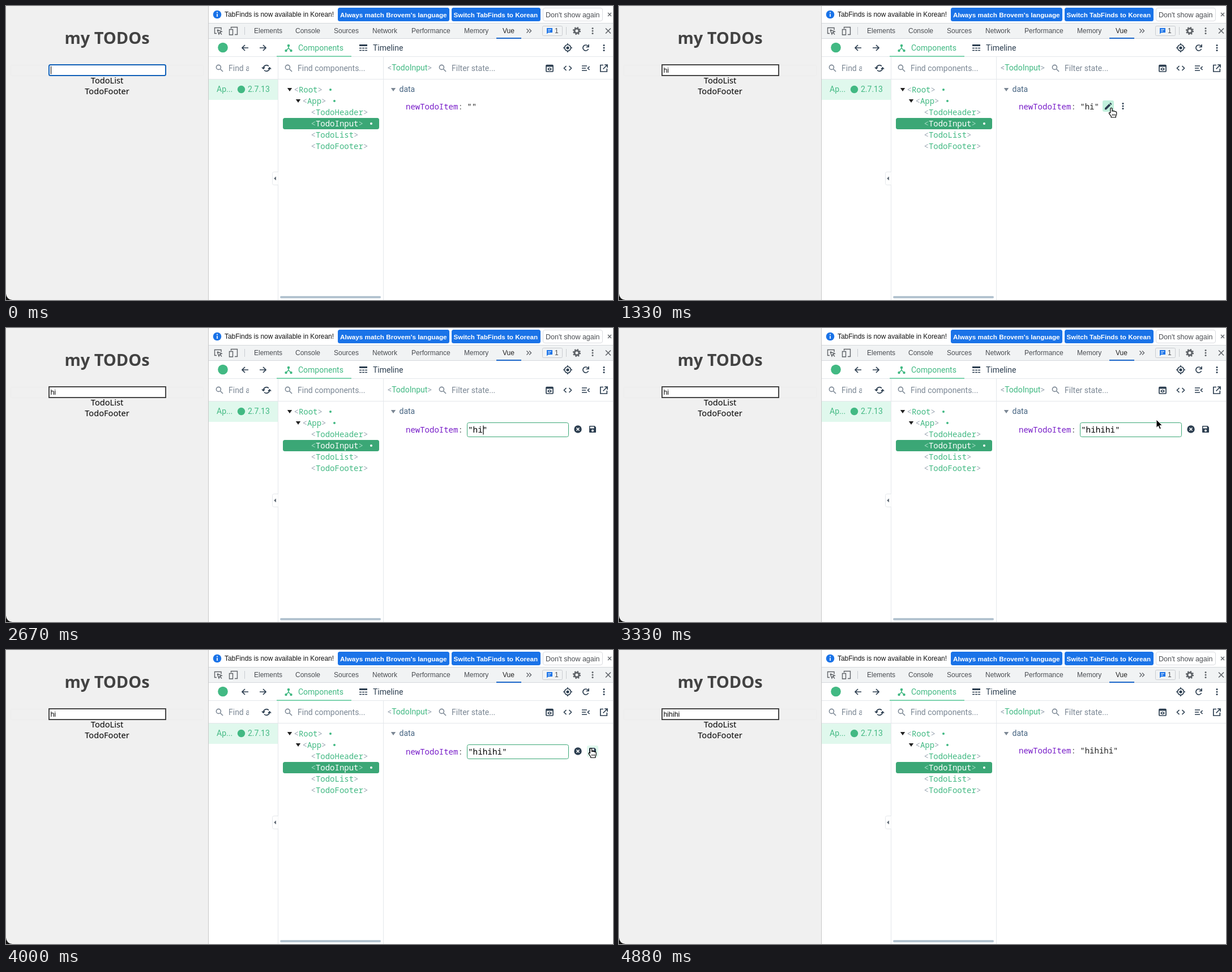
Animation of 1072x520 px, one loop 5.43 s. Source, as an HTML page:

```html
<!DOCTYPE html>
<html lang="en">
<head>
<meta charset="utf-8">
<title>Todo input inspector</title>
<style>
html, body { margin: 0; width: 100%; height: 100%; overflow: hidden; background: #fff; }
svg { display: block; }
text { white-space: pre; }
.ui { font: 12px "Liberation Sans", Arial, sans-serif; fill: #4a4d52; }
.bold { font: bold 11.7px "Liberation Sans", Arial, sans-serif; fill: #fff; }
.app { font: 14px Roboto, sans-serif; fill: #2c3e50; }
.mono { font: 14px "Noto Sans Mono", monospace; fill: #222; }
.page { font: 14.6px "Noto Sans", sans-serif; fill: #000; text-anchor: middle; }
.app.hint { fill: #7b8794; }
.app.green, .mono.green { fill: #42b983; }
.dim { fill: #9aa5b1; }
.line { fill: none; stroke: #e4e7eb; }
.icon { fill: none; stroke: #2c3e50; stroke-width: 1.7; }
.grey { fill: none; stroke: #5f6368; stroke-width: 1.4; }
.dark { fill: #2c3e50; }
</style>
</head>
<body>
<svg width="1072" height="520" viewBox="0 0 1072 520">
  <defs>
    <g id="search" fill="none" stroke="#7b8794" stroke-width="1.6"><circle cx="-1.6" cy="-1.6" r="4"/><path d="M1.5 1.5 6 6"/></g>
    <g id="dots"><circle cy="-4.5" r="1.5"/><circle r="1.5"/><circle cy="4.5" r="1.5"/></g>
    <path id="down" d="M-4.2-3h8.4L0 3z"/>
    <path id="arrow" d="M0 0v14.5l3.4-3.2 2.4 5.6 2.5-1.1-2.4-5.4h4.7z" fill="#000" stroke="#fff"/>
    <path id="beam" d="M-3.5-7.5Q0-7.5 0-5V5Q0 7.5-3.5 7.5M3.5-7.5Q0-7.5 0-5M0 5Q0 7.5 3.5 7.5M-2 2.5h4" fill="none" stroke="#222" stroke-width="1.2"/>
    <g id="hand"><path d="M-1.6 9V1.3Q0-.8 1.6 1.3V6q1.5-1.2 2.7.3 1.5-1 2.5.6 2.2-.5 2.4 1.6v3.3q-.2 1.8-1.4 3V17H-.3v-1.8l-3.6-5q-.6-2 1-1.7z" fill="#fff" stroke="#000" stroke-width="1.2"/><path d="M1.8 11v3M4.2 11v3M6.6 11v3" stroke="#000"/></g>
    <clipPath id="findClip"><rect x="390" y="98" width="39" height="24"/></clipPath>
  </defs>

  <!-- page -->
  <rect width="357" height="520" fill="#f0f0f0"/>
  <path d="M0 509v11h11Q1 519 0 509z" fill="#111"/>
  <path d="M357.5 0v520" stroke="#c8c8c8"/>
  <text class="page" x="178.5" y="67" style="font-size:28.9px;font-weight:bold;fill:#424242">my TODOs</text>
  <rect class="line" x="8.5" y="104.5" width="340" height="19" rx="2" style="stroke:#ececec"/>
  <rect id="field" x="76" y="104" width="206" height="19" fill="#fff"/>
  <text id="typed" class="ui" x="78.5" y="118" style="fill:#000;font-size:12.3px"></text>
  <path id="fieldCaret" d="M0 106.5v14" stroke="#000"/>
  <text class="page" x="178.5" y="137">TodoList</text>
  <text class="page" x="178.5" y="156">TodoFooter</text>

  <!-- notice bar -->
  <circle cx="373" cy="15" r="7.3" fill="#1a73e8"/>
  <path d="M373 10.5v2M373 14v5" stroke="#fff" stroke-width="1.7"/>
  <text class="ui" x="386" y="19" style="fill:#111;font-size:11.9px">TabFinds is now available in Korean!</text>
  <rect x="586" y="3" width="197" height="24" rx="3.5" fill="#1a73e8"/>
  <text class="bold" x="590" y="19.5">Always match Brovem's language</text>
  <rect x="787" y="3" width="157" height="24" rx="3.5" fill="#1a73e8"/>
  <text class="bold" x="790.5" y="19.5" style="font-size:11.6px">Switch TabFinds to Korean</text>
  <rect x="948.5" y="3.5" width="105" height="23" rx="3.5" fill="#fff" stroke="#dadce0"/>
  <text class="ui" x="953" y="19.5" style="font-size:12.5px">Don't show again</text>
  <path class="grey" d="M1063 12l6 6m0-6-6 6"/>

  <!-- tool tabs -->
  <rect x="358" y="30" width="714" height="28" fill="#f1f3f4"/>
  <path class="line" d="M358 30.5h714M358 57.5h714" style="stroke:#d5d8dc"/>
  <g id="tabs"></g>
  <rect x="866" y="56" width="44" height="2" fill="#1b66c9"/>
  <path class="grey" d="M372 48.5h-3.5v-10h11.5v4M373 42l8 3.2-3.3 1.3 3.3 4M373 42l3 8 1.7-3.5M397.5 40v-2.5h11v13h-4.5M394.5 41.5h6v9.500h-6zM919.5 40.5l3.5 3.5-3.5 3.5M924 40.5l3.5 3.5-3.5 3.5"/>
  <path class="line" d="M421.5 37v14M989.5 37v14" style="stroke:#c9ccd0"/>
  <rect class="line" x="947.5" y="35.5" width="35" height="17" rx="2" style="stroke:#c9ccd0"/>
  <path d="M955 39h10v8h-7.5l-2.5 2.5z" fill="#1a73e8"/>
  <path d="M957 41.7h6M957 44.3h4" stroke="#fff"/>
  <text class="ui" x="969" y="48">1</text>
  <circle class="grey" cx="1008" cy="44" r="4" style="stroke-width:3"/>
  <circle class="grey" cx="1008" cy="44" r="6" style="stroke-width:2.2;stroke-dasharray:2.3 2.41"/>
  <use href="#dots" x="1036" y="44" fill="#5f6368"/>
  <path class="grey" d="M1059 39.5l9 9m0-9-9 9" style="stroke-width:1.6"/>

  <!-- inspector header -->
  <circle cx="383" cy="73.5" r="8.8" fill="#42b983"/>
  <path class="icon" d="M428 74h-11m5-5-5 5 5 5M448 74h11m-5-5 5 5-5 5"/>
  <path class="line" d="M358 89.5h714M358 129.5h714M480.5 90v430M666.5 90v430"/>
  <rect x="478" y="88" width="132" height="2" fill="#7dd3ae"/>
  <g fill="#42b983"><circle cx="499" cy="70" r="2.3"/><circle cx="494.5" cy="79" r="2.2"/><circle cx="503.5" cy="79" r="2.2"/></g>
  <path d="M499 70v4.5l-4.5 4.5M499 74.5l4.5 4.5" fill="none" stroke="#42b983" stroke-width="1.6"/>
  <text class="app green" x="516" y="79">Components</text>
  <path class="icon" d="M624 69.5h14" style="stroke-width:3"/>
  <path class="icon" d="M624 74.5h14M624 78.5h14" style="stroke-dasharray:4 1"/>
  <text class="app" x="648" y="79">Timeline</text>
  <circle class="icon" cx="992" cy="74" r="5.5"/><circle class="dark" cx="992" cy="74" r="2.6"/>
  <path class="icon" d="M992 66v3M992 79v3M984 74h3M997 74h3M1028.5 76a5 5 0 1 1-1-5.5l1.5 1.5M1029 68v4.5h-4.5"/>
  <use href="#dots" class="dark" x="1056" y="74"/>

  <!-- filters -->
  <use href="#search" x="377" y="110"/><use href="#search" x="499" y="110"/><use href="#search" x="771" y="110"/>
  <text class="app hint" x="393" y="115" clip-path="url(#findClip)">Find apps...</text>
  <path class="icon" d="M454.5 110a5.5 5.5 0 0 1 9.5-3.5M465.5 110a5.5 5.5 0 0 1-9.5 3.5M452 108.5l2.5 2.5 2.5-2.5M463 111.5l2.5-2.5 2.5 2.5"/>
  <text class="app hint" x="515" y="115">Find components...</text>
  <text class="app green" x="674" y="114"><tspan class="dim">&lt;</tspan>TodoInput<tspan class="dim">&gt;</tspan></text>
  <text class="app hint" x="787" y="115">Filter state...</text>
  <rect class="icon" x="954" y="104.5" width="12" height="11.5" rx="1"/>
  <path class="dark" d="M954 104h12v3.5h-12zM956 111.5q4-5 8 0-4 5-8 0z"/>
  <circle cx="960" cy="111.5" r="1.2" fill="#fff"/>
  <path class="icon" d="M989.5 106l-4 4 4 4M994.5 106l4 4-4 4M1017 106h9M1017 110h7M1017 114h9M1030.5 107l-3 3 3 3M1055 104.5h-5.2v11.5h11.5v-5.2M1057 104h5v5M1061.5 104.5l-7 7"/>

  <!-- app list -->
  <rect x="358" y="130" width="122" height="36" fill="#e0f8ed"/>
  <text class="app green" x="372" y="152">Ap...</text>
  <circle cx="415.5" cy="147.5" r="6.7" fill="#42b983"/>
  <text class="app green" x="427" y="152">2.7.13</text>
  <path d="M480.5 293.5h-7q-3 0-3 3v17q0 3 3 3h7" fill="#fff" stroke="#e4e7eb"/>
  <path d="M477 301.5v7l-4-3.5z" fill="#66707a"/>
  <rect x="484" y="513" width="178" height="4" rx="2" fill="#b3c3d0"/>

  <!-- component tree -->
  <rect x="489" y="198" width="170" height="20" rx="3.5" fill="#3ba776"/>
  <use href="#down" x="501" y="148" fill="#222"/><use href="#down" x="516" y="168" fill="#222"/>
  <g id="tree"></g>
  <g fill="#42b983"><circle cx="573" cy="148" r="2"/><circle cx="580" cy="168" r="2"/><circle cx="645" cy="208" r="2" fill="#fff"/></g>

  <!-- state -->
  <use href="#down" x="684" y="148" fill="#7b8794"/>
  <text class="app" x="694.5" y="152" style="fill:#476582">data</text>
  <text id="key" class="mono" x="706" y="183"><tspan fill="#771cc8">newTodoItem</tspan><tspan fill="#555">:</tspan></text>
  <text id="value" class="mono" x="814.3" y="183"></text>
  <g id="tools">
    <rect x="854" y="167" width="20" height="20" rx="3" fill="#c2f0dc"/>
    <path class="dark" d="M858 180.5l7.5-7.5 2.7 2.7-7.5 7.5H858zM866.3 172.2l1.5-1.5 2.7 2.7-1.5 1.5z"/>
    <use href="#dots" class="dark" x="890" y="177"/>
  </g>
  <g id="editor">
    <rect x="814.5" y="167.5" width="179" height="25" rx="3" fill="#fff" stroke="#3ba776"/>
    <text id="draft" class="mono" x="816" y="185" style="font-size:14.3px;fill:#000"></text>
    <path id="caret" d="M0 172.5v16" stroke="#000" stroke-width="1.2"/>
    <circle class="dark" cx="1010" cy="179" r="6.7"/>
    <path d="M1007.5 176.5l5 5m0-5-5 5" stroke="#fff" stroke-width="1.6"/>
    <rect id="saveGlow" x="1026" y="169" width="20" height="20" rx="3" fill="#e0f8ed"/>
    <path class="dark" d="M1030 174q0-1 1-1h8.5l2.5 2.5v8.5q0 1-1 1h-10q-1 0-1-1z"/>
    <path d="M1031.5 174.5h7v3h-7z" fill="#fff"/><circle cx="1036" cy="181.5" r="2" fill="#fff"/>
  </g>
  <use id="pointer"/>
</svg>
<script>
const $ = id => document.getElementById(id);
const show = (id, on) => $(id).setAttribute("visibility", on ? "visible" : "hidden");
const set = (id, attrs) => Object.entries(attrs).forEach(([k, v]) => $(id).setAttribute(k, v));

const tabs = { Elements: 438, Console: 511, Sources: 579, Network: 647, Performance: 716, Memory: 809, Vue: 877 };
$("tabs").innerHTML = Object.entries(tabs).map(([name, x]) =>
  `<text class="ui" x="${x}" y="48"${name === "Vue" ? ' style="fill:#222"' : ""}>${name}</text>`).join("");

const depth = [0, 1, 2, 2, 2, 2];
$("tree").innerHTML = ["Root", "App", "TodoHeader", "TodoInput", "TodoList", "TodoFooter"].map((name, i) => {
  const picked = name === "TodoInput";
  const bracket = s => `<tspan fill="${picked ? "#a5dcc4" : "#9aa5b1"}">${s}</tspan>`;
  return `<text class="mono green" x="${508.5 + 15 * depth[i]}" y="${153 + 20 * i}"${picked ? ' style="fill:#fff"' : ""}>` +
    bracket("&lt;") + name + bracket("&gt;") + "</text>";
}).join("");

// Each step lists only what differs from the step before it.
const LOOP = 5430;
const steps = [
  { at: 0, typed: "", focus: true, fieldCaret: 79.5, draft: null, caret: 0, pointer: null },
  { at: 330, typed: "h", fieldCaret: 0 },
  { at: 670, typed: "hi", pointer: ["arrow", 569.5, 7] },
  { at: 1000, fieldCaret: 89.5, pointer: ["arrow", 884, 196] },
  { at: 1330, focus: false, fieldCaret: 0, tools: true, pointer: ["hand", 869.5, 180] },
  { at: 1670, tools: false, draft: "hi", pointer: ["arrow", 872, 192] },
  { at: 2000, caret: 843, pointer: ["beam", 894.5, 177] },
  { at: 2330, caret: 0, pointer: ["beam", 895.5, 177] },
  { at: 2670, caret: 843, pointer: null },
  { at: 3000, draft: "hihihi", caret: 877 },
  { at: 3330, caret: 0, pointer: ["arrow", 949, 162] },
  { at: 3670, pointer: ["arrow", 1061, 171] },
  { at: 4000, saving: true, pointer: ["hand", 1033, 173.5] },
  { at: 4330, saving: false, typed: "hihihi", draft: null, pointer: ["arrow", 984, 249] },
  { at: 4880, pointer: null }
];

function draw(s) {
  const editing = s.draft !== null;
  $("typed").textContent = s.typed;
  $("value").textContent = `"${s.typed}"`;
  $("draft").textContent = `"${s.draft}"`;
  set("key", { y: editing ? 185 : 183 });
  set("field", { stroke: s.focus ? "#1060b8" : "#333", rx: s.focus ? 2.5 : 0, "stroke-width": s.focus ? 2 : 1.8 });
  set("fieldCaret", { transform: `translate(${s.fieldCaret})` });
  set("caret", { transform: `translate(${s.caret})` });
  show("fieldCaret", s.fieldCaret);
  show("value", !editing);
  show("tools", s.tools);
  $("editor").style.display = editing ? "" : "none";
  show("caret", s.caret);
  show("saveGlow", s.saving);
  show("pointer", s.pointer);
  if (s.pointer) {
    const [shape, x, y] = s.pointer;
    set("pointer", { href: "#" + shape, x, y });
  }
}

function tick() {
  const t = performance.now() % LOOP;
  draw(Object.assign({}, ...steps.filter(s => s.at <= t)));
  requestAnimationFrame(tick);
}
tick();
</script>
</body>
</html>
```
